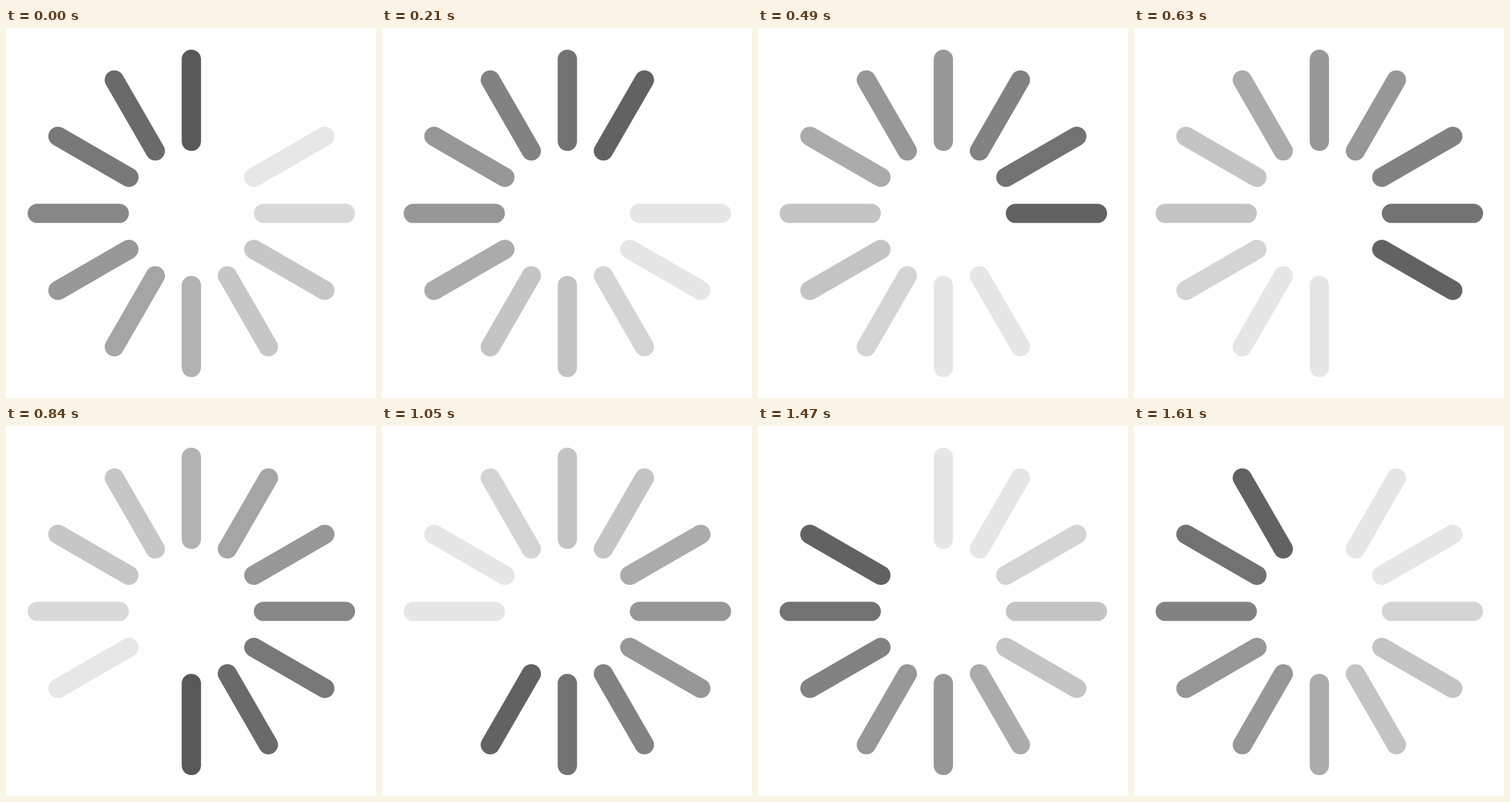
Write an HTML page that moves like this. It is 512x512 px and loops after 1680 ms.

```html
<!DOCTYPE html>
<html lang="en">
<head>
<meta charset="utf-8">
<title>Spinner</title>
<style>
  html, body { margin: 0; height: 100%; overflow: hidden; background: #fefefe; }
  svg { display: block; width: 100vw; height: 100vh; }
</style>
</head>
<body>
<svg viewBox="0 0 512 512" stroke-width="26.7" stroke-linecap="round"></svg>
<script>
const BARS = 12, STEPS = 24, STEP_MS = 70;
// Grey level of a bar by its age in steps; the last two steps are invisible.
const SHADES = [88, 98, 106, 114, 120, 130, 135, 151, 152, 151, 165, 171,
                178, 196, 198, 196, 198, 212, 217, 230, 231, 230];

const svg = document.querySelector('svg');
const bars = Array.from({ length: BARS }, (_, i) => {
  const line = document.createElementNS(svg.namespaceURI, 'line');
  const place = { x1: 0, x2: 0, y1: -213.2, y2: -99.8,
    transform: `translate(256.5 256.5) rotate(${i * 360 / BARS})` };
  for (const key in place) line.setAttribute(key, place[key]);
  return svg.appendChild(line);
});

function draw(now) {
  const step = Math.floor(now / STEP_MS) % STEPS;
  bars.forEach((bar, i) => {
    const shade = SHADES[(step - 2 * i + STEPS) % STEPS];
    bar.setAttribute('stroke', shade ? `rgb(${shade},${shade},${shade})` : 'none');
  });
}

const start = performance.now();
function tick() {
  draw(performance.now() - start);
  requestAnimationFrame(tick);
}
tick();
</script>
</body>
</html>
```
